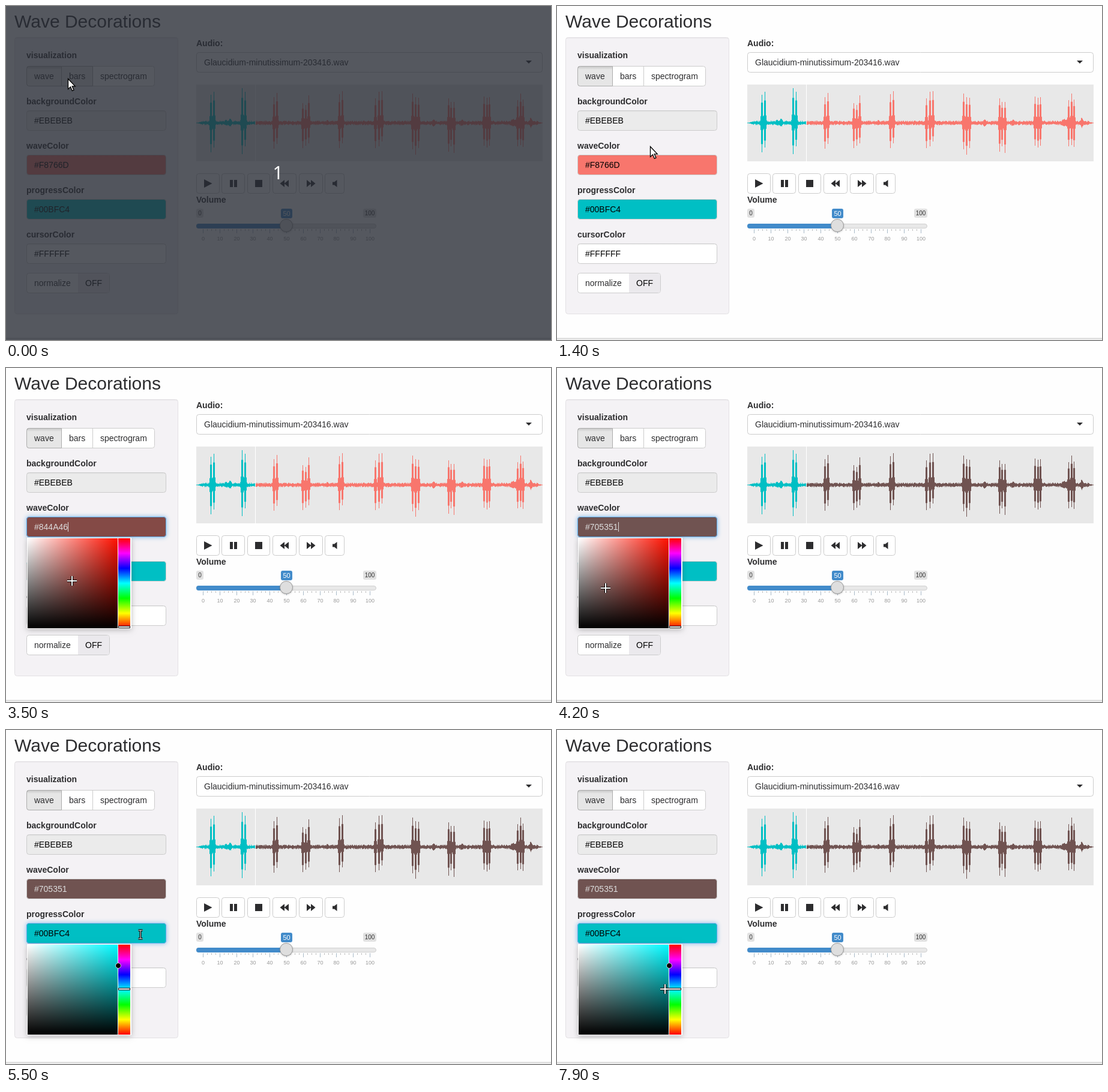
Animation of 908 by 557 pixels, one loop 8 s. Source, as an HTML page with a canvas:

```html
<!DOCTYPE html>
<html lang="en">
<head>
<meta charset="utf-8">
<title>Wave Decorations</title>
<style>
html, body { margin: 0; width: 100%; height: 100%; overflow: hidden; background: #fefefe; }
canvas { display: block; }
</style>
</head>
<body>
<canvas id="stage" width="908" height="557"></canvas>
<script>
const ctx = document.getElementById('stage').getContext('2d');
const LOOP = 8000;
const SANS = '"Liberation Sans", Arial, sans-serif';
const INK = '#2d2d2f', BORDER = '#ccc', BLUE = '#428bca';
const CORAL = '#F8766D', TEAL = '#00BFC4', BROWN = '#705351';

// time, x, y, pointer shape
const track = [
  [0, 103, 121, 'arrow'], [400, 105, 130, 'arrow'], [500, 112, 153, 'arrow'],
  [600, 120, 191, 'beam'], [800, 126, 192, 'beam'], [900, 134, 194, 'beam'],
  [1000, 143, 197, 'beam'], [1100, 151, 199, 'beam'], [1200, 158, 200, 'beam'],
  [1400, 155, 234, 'arrow'], [1500, 166, 258, 'beam'], [1600, 195, 271, 'beam'],
  [1700, 190, 275, 'beam'], [1800, 172, 274, 'beam'], [2000, 158, 272, 'beam'],
  [2700, 158, 290, 'cross'], [2800, 150, 315, 'cross'], [2900, 140, 335, 'cross'],
  [3300, 132, 342, 'cross'], [3400, 121, 349, 'cross'], [3500, 110, 355, 'cross'],
  [3600, 100, 360, 'cross'], [3700, 91, 364, 'cross'], [3800, 84, 366, 'cross'],
  [3900, 81, 367, 'cross'], [4400, 100, 363, 'cross'], [4500, 138, 356, 'cross'],
  [4600, 180, 349, 'cross'], [4700, 212, 343, 'beam'], [4800, 224, 341, 'beam'],
  [5600, 216, 352, 'beam'], [5700, 202, 385, 'size'], [5900, 198, 410, 'size'],
  [6100, 196, 422, 'size'], [6300, 196, 428, 'size'], [7600, 190, 431, 'size'],
  [7700, 180, 432, 'cross']
];

// x, top and bottom of each chirp
const spikes = [
  [341, 148, 244], [346, 143, 236], [393, 137, 247], [398, 143, 234],
  [446, 152, 238], [451, 145, 230], [494, 162, 237], [499, 165, 233], [504, 149, 229],
  [555, 147, 237], [560, 142, 229], [615, 154, 237], [621, 143, 234], [626, 142, 226],
  [677, 146, 239], [682, 152, 248], [687, 153, 237], [737, 154, 243], [741, 160, 234],
  [746, 160, 245], [796, 151, 233], [801, 153, 236], [805, 152, 233],
  [852, 157, 234], [857, 146, 232], [861, 156, 235]
];
const bumps = [[373, 4], [367, 2], [712, 3], [759, 3], [844, 4], [849, 4], [874, 6], [535, 2]];

function random(seed) {
  return () => {
    seed = (seed * 1664525 + 1013904223) >>> 0;
    return seed / 4294967296;
  };
}

function buildWave() {
  const rnd = random(11);
  const cols = [];
  for (let x = 317; x < 894; x++) {
    const edge = Math.min(1, Math.max(0, (x - 319) / 8), Math.max(0, (892 - x) / 8));
    let up = 0.5 + edge * (1 + rnd() * 2.3), down = 0.5 + edge * (1 + rnd() * 2.3);
    for (const [bx, h] of bumps) {
      const k = h * Math.exp(-((x - bx) ** 2) / 5);
      up += k;
      down += k * 0.8;
    }
    for (const [sx, top, bottom] of spikes) {
      const d = Math.abs(x - sx);
      const k = [1, 0.72, 0.24, 0.08][d] || 0;
      up = Math.max(up, (195 - top) * k);
      down = Math.max(down, (bottom - 195) * k);
    }
    cols.push([x, up, down]);
  }
  return cols;
}
const wave = buildWave();

function rect(x, y, w, h, fill) {
  ctx.fillStyle = fill;
  ctx.fillRect(x, y, w, h);
}

function roundPath(x, y, w, h, r) {
  ctx.beginPath();
  ctx.roundRect(x, y, w, h, r);
}

function box(x, y, w, h, fill, stroke = BORDER, r = 4) {
  roundPath(x + 0.5, y + 0.5, w - 1, h - 1, r);
  ctx.fillStyle = fill;
  ctx.fill();
  ctx.strokeStyle = stroke;
  ctx.lineWidth = 1;
  ctx.stroke();
}

function text(str, x, y, { size = 14, color = INK, bold = false, align = 'left', family = SANS } = {}) {
  ctx.font = `${bold ? 'bold ' : ''}${size}px ${family}`;
  ctx.textAlign = align;
  ctx.fillStyle = color;
  ctx.fillText(str, x, y);
}

function poly(points, fill) {
  ctx.beginPath();
  points.forEach(([x, y]) => ctx.lineTo(x, y));
  ctx.closePath();
  ctx.fillStyle = fill;
  ctx.fill();
}

function innerShade(x, y, w, h, strength, depth) {
  const g = ctx.createLinearGradient(0, y, 0, y + depth);
  g.addColorStop(0, `rgba(0,0,0,${strength})`);
  g.addColorStop(1, 'rgba(0,0,0,0)');
  rect(x, y, w, depth, g);
}

function hsvHex(h, s, v) {
  const channel = n => {
    const k = (n + h / 60) % 6;
    const c = v - v * s * Math.max(0, Math.min(k, 4 - k, 1));
    return Math.round(c * 255).toString(16).padStart(2, '0');
  };
  return ('#' + channel(5) + channel(3) + channel(1)).toUpperCase();
}

function isDark(hex) {
  const n = parseInt(hex.slice(1), 16);
  return 0.3 * (n >> 16) + 0.59 * (n >> 8 & 255) + 0.11 * (n & 255) < 130;
}

function field(y, value, focused, caret) {
  const ink = isDark(value) ? '#ddd' : '#000';
  if (focused) {
    ctx.save();
    ctx.shadowColor = 'rgba(102,175,233,.8)';
    ctx.shadowBlur = 7;
    box(34, y, 233, 34, value, '#66afe9');
    ctx.restore();
  }
  box(34, y, 233, 34, value, focused ? '#66afe9' : BORDER);
  innerShade(36, y + 1, 229, 34, 0.06, 2);
  text(value, 47, y + 22, { color: ink });
  if (caret) rect(Math.round(47 + ctx.measureText(value).width), y + 9, 1, 16, ink);
}

function picker(y, hue, mark) {
  ctx.save();
  ctx.shadowColor = 'rgba(0,0,0,.25)';
  ctx.shadowBlur = 9;
  ctx.shadowOffsetY = 2;
  rect(35, y - 1, 174, 152, '#fff');
  ctx.restore();

  rect(36, y, 150, 150, `hsl(${hue},100%,50%)`);
  let g = ctx.createLinearGradient(36, 0, 186, 0);
  g.addColorStop(0, '#fff');
  g.addColorStop(1, 'rgba(255,255,255,0)');
  rect(36, y, 150, 150, g);
  g = ctx.createLinearGradient(0, y, 0, y + 150);
  g.addColorStop(0, 'rgba(0,0,0,0)');
  g.addColorStop(1, '#000');
  rect(36, y, 150, 150, g);

  g = ctx.createLinearGradient(0, y, 0, y + 150);
  for (let i = 0; i <= 6; i++) g.addColorStop(i / 6, `hsl(${360 - i * 60},100%,50%)`);
  rect(187, y, 20, 150, g);

  rect(187, 430, 20, 4, '#000');
  rect(188, 431, 18, 2, '#fff');
  if (mark) {
    ctx.beginPath();
    ctx.arc(mark[0], mark[1], 4.4, 0, 7);
    ctx.fillStyle = '#000';
    ctx.fill();
    ctx.strokeStyle = 'rgba(255,255,255,.75)';
    ctx.lineWidth = 1;
    ctx.stroke();
  }
}

function drawChoices(hover) {
  box(34, 100, 214, 34, '#fff');
  if (hover) box(92, 100, 53, 34, '#e6e6e6', '#adadad', 0);
  rect(144, 101, 1, 32, hover ? '#adadad' : BORDER);
  box(34, 100, 59, 34, '#e6e6e6', '#adadad', [4, 0, 0, 4]);
  innerShade(35, 101, 57, 32, 0.13, 5);
  text('wave', 47, 122);
  text('bars', 105, 122);
  text('spectrogram', 157, 122);
}

function drawSidebar(s) {
  box(14, 52, 273, 462, '#f4f2f5', '#e3e1e4');
  innerShade(16, 53, 269, 460, 0.05, 2);
  const labels = ['backgroundColor', 'waveColor', 'progressColor', 'cursorColor'];
  text('visualization', 34, 87, { bold: true });
  labels.forEach((label, i) => text(label, 34, 164 + 74 * i, { bold: true }));
  drawChoices(s.hover);
  const values = ['#EBEBEB', s.picked, TEAL, '#FFFFFF'];
  values.forEach((value, i) => field(174 + 74 * i, value, s.focus === i, s.focus === i && s.caret));

  box(34, 445, 139, 34, '#fff');
  roundPath(120, 446, 52, 32, [0, 3, 3, 0]);
  ctx.fillStyle = '#ebe9ed';
  ctx.fill();
  text('normalize', 47, 467);
  text('OFF', 132, 467, { color: '#000' });

  if (s.focus === 1) picker(284, 4, s.mark);
  if (s.focus === 2) picker(358, 181.5, [187, 393]);
}

function drawWave(color) {
  rect(317, 131, 577, 128, '#e8e8e8');
  for (const [x, up, down] of wave) rect(x, 195 - up, 1, up + down, x < 415 ? TEAL : color);
  rect(415, 131, 1, 128, '#fff');
}

function triangle(x, y, w, h) {
  poly([[x, y - h], [x + w, y], [x, y + h]], INK);
}

function drawButtons() {
  const spans = [[317, 39], [359, 39], [402, 38], [444, 40], [488, 40], [531, 33]];
  spans.forEach(([x, w]) => box(x, 279, w, 34, '#fff'));
  triangle(330, 296, 13.5, 7);
  rect(373, 290, 5, 12, INK);
  rect(380, 290, 5, 12, INK);
  rect(415, 290, 12, 12, INK);
  triangle(464, 296, -7.5, 6);
  triangle(471, 296, -7.5, 6);
  triangle(501, 296, 7.5, 6);
  triangle(508, 296, 7.5, 6);
  poly([[544, 293.5], [547, 293.5], [551.5, 290], [551.5, 302], [547, 298.5], [544, 298.5]], INK);
}

function tag(str, x, y, w, h, fill, style) {
  roundPath(x, y, w, h, 3);
  ctx.fillStyle = fill;
  ctx.fill();
  text(str, x + w / 2, y + h - 4, { align: 'center', ...style });
}

function drawSlider() {
  text('Volume', 317, 328, { bold: true });
  tag('0', 317, 338, 12, 15, '#e1e1e1', { size: 10, color: '#333' });
  tag('100', 595, 338, 22, 15, '#e1e1e1', { size: 10, color: '#333' });
  tag('50', 458, 338, 19, 16, BLUE, { size: 11, color: '#fff' });
  box(317, 363, 300, 8, '#e8e8e8', '#d0d0d0');
  roundPath(317, 363, 150, 8, [4, 0, 0, 4]);
  ctx.fillStyle = BLUE;
  ctx.fill();
  for (let i = 0; i <= 40; i++) {
    const x = Math.round(328 + i * 6.95);
    const major = i % 4 === 0;
    rect(x, 372, 1, major ? 7 : 3, major ? '#a9bac8' : '#bbb');
    if (major) text(String(i * 2.5), x + 0.5, 391, { size: 9, color: '#999', align: 'center' });
  }
  ctx.save();
  ctx.shadowColor = 'rgba(0,0,0,.25)';
  ctx.shadowBlur = 3;
  ctx.shadowOffsetY = 1;
  ctx.beginPath();
  ctx.arc(467, 366, 10.5, 0, 7);
  ctx.fillStyle = '#dedede';
  ctx.fill();
  ctx.restore();
  ctx.strokeStyle = '#999';
  ctx.lineWidth = 1;
  ctx.stroke();
}

function drawMain(color) {
  text('Audio:', 317, 67, { bold: true });
  box(317, 77, 577, 34, '#fff');
  text('Glaucidium-minutissimum-203416.wav', 330, 99);
  poly([[866, 91], [876, 91], [871, 96]], INK);
  drawWave(color);
  drawButtons();
  drawSlider();
}

function outline(path, outer, inner) {
  ctx.strokeStyle = '#000';
  ctx.lineWidth = outer;
  ctx.stroke(path);
  ctx.strokeStyle = '#fff';
  ctx.lineWidth = inner;
  ctx.stroke(path);
}

const glyphs = {
  arrow: new Path2D('M.5 .5V17.5L4.5 13.8L7.3 20.3L10 19.2L7.2 12.8H12.2Z'),
  beam: new Path2D('M-3.5 -7H3.5M0 -7V7M-3.5 7H3.5'),
  cross: new Path2D('M-8 0H8M0 -8V8'),
  size: new Path2D('M0 -10L6 -4H2V4H6L0 10L-6 4H-2V-4H-6Z')
};

function drawPointer(x, y, shape) {
  const path = glyphs[shape];
  ctx.save();
  ctx.translate(x, y);
  if (shape === 'beam') outline(path, 3.4, 1);
  else if (shape === 'cross') outline(path, 4, 2);
  else {
    ctx.fillStyle = '#fff';
    ctx.fill(path);
    ctx.strokeStyle = '#000';
    ctx.lineWidth = 1.3;
    ctx.stroke(path);
  }
  ctx.restore();
}

function pickedColor(t, x, y) {
  if (t < 3300) return CORAL;
  if (t >= 3900) return BROWN;
  return hsvHex(3.9, (x - 39.45) / 150, 1 - (y - 282.9) / 150);
}

function caretOn(t) {
  if (t >= 4900) return Math.floor((t - 4900) / 600) % 2 === 0;
  return (t >= 2100 && t < 2700) || (t >= 3300 && t < 4500);
}

function markAt(t) {
  if (t < 3300) return [121, 289];
  return t < 4400 ? null : [81, 367];
}

function draw(t) {
  const [, x, y, shape] = track.findLast(k => k[0] <= t);
  rect(0, 0, 908, 557, '#fefefe');
  text('Wave Decorations', 14, 36, { size: 30 });
  drawSidebar({
    hover: t < 500,
    focus: t < 2100 ? 0.5 : t < 5000 ? 1 : 2,
    picked: pickedColor(t, x, y),
    caret: caretOn(t),
    mark: markAt(t)
  });
  drawMain(t < 4100 ? CORAL : BROWN);
  rect(0, 553, 908, 4, '#efefef');
  rect(0, 554, 908, 1, '#d2d2d2');

  if (t < 200) rect(0, 0, 908, 557, `rgba(40,44,53,${t < 100 ? 0.79 : 0.35})`);
  if (t < 100) {
    text('1', 453, 289, { size: 30, color: '#fff', align: 'center', family: '"Noto Sans", sans-serif' });
  }
  drawPointer(x, y, shape);
}

let start;
function tick(now) {
  start ??= now;
  draw((now - start) % LOOP);
  requestAnimationFrame(tick);
}
draw(0);
requestAnimationFrame(tick);
</script>
</body>
</html>
```
